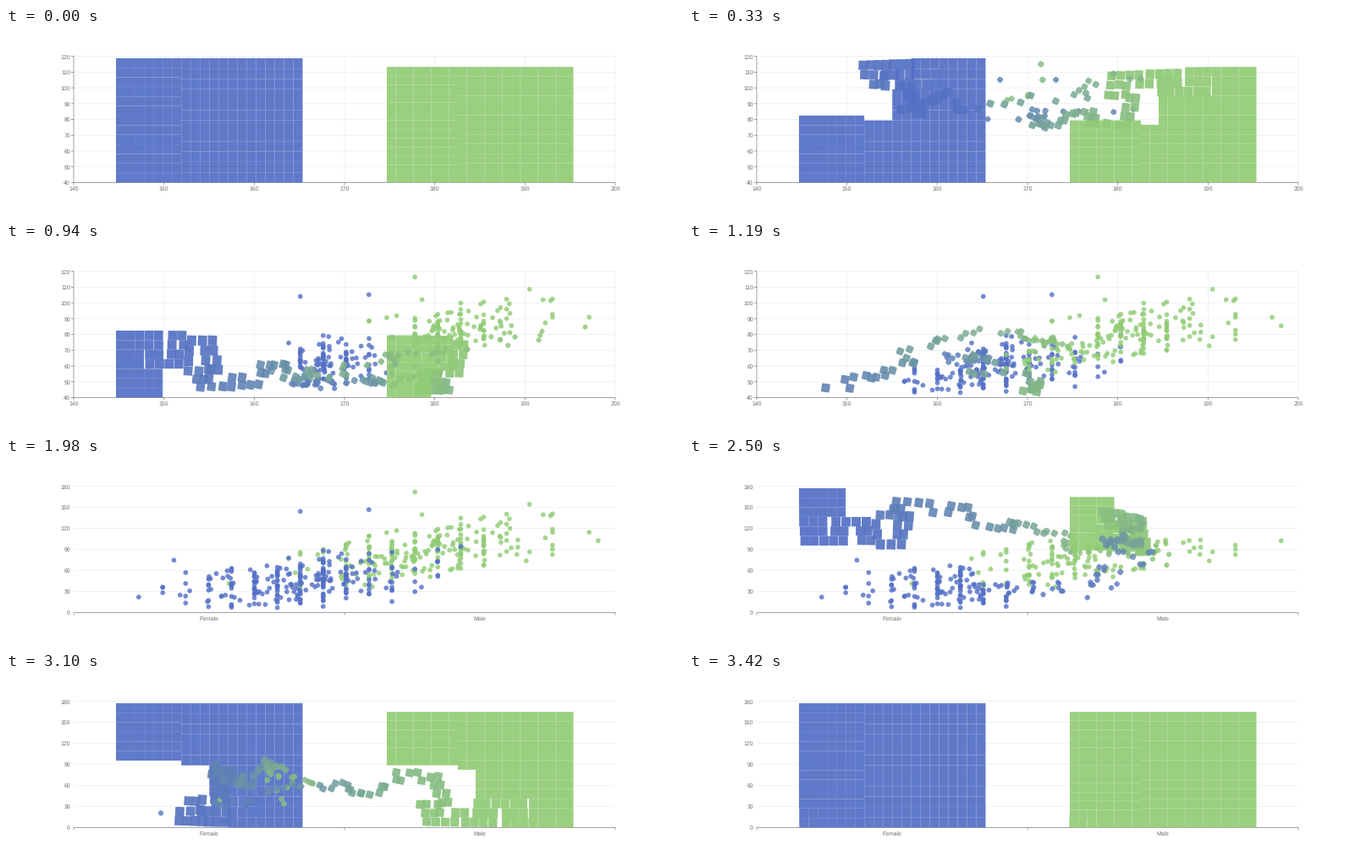
Animation, 800 px wide and 222 px high, one loop 3.45 s. Source, as a matplotlib script:

```python
import numpy as np
import matplotlib.pyplot as plt
from matplotlib.animation import FuncAnimation
from matplotlib.collections import LineCollection, PolyCollection
from matplotlib.colors import to_rgb

plt.rcParams["text.hinting"] = "none"

W, H, DPI = 800, 222, 100
LOOP, TICK = 3450, 10
SCATTER_END, BARS_IN = 1500, 1980
LEAD = 20  # the way back is already under way when it appears
DURATION, SPREAD = 500, 1000
LEFT, RIGHT, TOP, BASE = 80, 720, 33.6, 183.5
RADIUS = 2.86
BLUE, GREEN = (np.array(to_rgb(c)) for c in ("#5470c6", "#91cc75"))
BAR_ALPHA, DOT_ALPHA = 0.93, 0.82
GRID, INK = "#e4eeee", "#6e7079"

rng = np.random.default_rng(11)


def px(pt):
    return pt * 72 / DPI


# ---------- data: height (cm), weight (kg) ----------
def people(count, extremes, mean, sd, slope, noise, lo, hi):
    pts = list(extremes)
    while len(pts) < count:
        h = rng.normal(mean[0], sd)
        w = mean[1] + slope * (h - mean[0]) + rng.normal(0, noise)
        if rng.random() < 0.55:
            h = round(h / 2.54) * 2.54
        if lo[0] < h < hi[0] and lo[1] < w < hi[1]:
            pts.append((h, w))
    pts = np.array(pts)
    x = LEFT + (pts[:, 0] - 140) / 60 * (RIGHT - LEFT)
    y = BASE - (pts[:, 1] - 40) / 80 * (BASE - TOP)
    return np.column_stack([x, y])


women = people(260, [(147.2, 49.8), (151.1, 73.2), (165.1, 104.1), (172.7, 105.2), (182.9, 81.8)],
               mean=(164.9, 59.8), sd=6.3, slope=0.6, noise=8, lo=(149.5, 43), hi=(180.5, 87))
men = people(247, [(157.2, 58.4), (177.8, 116.4), (190.5, 108.6), (192, 102), (197.1, 90.9), (198.1, 85.5)],
             mean=(177.6, 77.6), sd=6.8, slope=0.75, noise=9, lo=(163, 54), hi=(193.5, 103))


# ---------- splitting and matching ----------
def split(x, y, w, h, count):
    """Divide a wide rect into columns of cells: rows of cx, cy, w, h."""
    cols = int(np.ceil(np.sqrt(w / h * count)))
    rows, spare = divmod(count, cols)
    cw = w / cols
    cells = []
    for c in range(cols):
        n = rows + (c < spare)
        cells += [(x + (c + 0.5) * cw, y + (r + 0.5) * h / n, cw, h / n)
                  for r in range(n)]
    return np.array(cells)


def hilbert(x, y):
    d, s = 0, 1 << 15
    while s:
        rx, ry = int(x & s > 0), int(y & s > 0)
        d += s * s * ((3 * rx) ^ ry)
        if not ry:
            if rx:
                x, y = s - 1 - x, s - 1 - y
            x, y = y, x
        s >>= 1
    return d


def curve_sort(a):
    xy = a[:, :2]
    lo, hi = xy.min(0), xy.max(0)
    grid = np.round(32767 * (xy - lo) / (hi - lo)).astype(int)
    keys = [hilbert(int(x), int(y)) for x, y in grid]
    return a[np.argsort(keys, kind="stable")]


PHI = np.radians(np.arange(0, 360, 15))
CIRCLE = np.column_stack([np.cos(PHI), np.sin(PHI)])
SQUARE = CIRCLE / np.abs(CIRCLE).max(1, keepdims=True)


class Group:
    """Cells of one bar paired with the dots they turn into."""

    def __init__(self, bar, dots, bar_color, dot_color):
        self.cells = curve_sort(split(*bar, len(dots)))
        self.dots = curve_sort(dots)
        self.delay = np.linspace(0, SPREAD, len(dots))
        self.colors = np.append(bar_color, BAR_ALPHA), np.append(dot_color, DOT_ALPHA)

    def progress(self, t):
        u = np.clip((t - self.delay) / DURATION, 0, 1)
        return np.where(u < 0.5, 4 * u ** 3, 1 - 4 * (1 - u) ** 3)

    def shapes(self, f):
        """f = 0 is the bar, f = 1 the dots."""
        k = f[:, None, None]
        outline = (SQUARE * self.cells[:, None, 2:] / 2) * (1 - k) + CIRCLE * RADIUS * k
        a = f[:, None] * np.pi / 4
        x, y = outline[..., 0], outline[..., 1]
        turned = np.stack([x * np.cos(a) - y * np.sin(a),
                           x * np.sin(a) + y * np.cos(a)], axis=-1)
        centre = self.cells[:, :2] * (1 - f[:, None]) + self.dots * f[:, None]
        bar, dot = self.colors
        return turned + centre[:, None], bar + (dot - bar) * f[:, None]


def bar_rect(x, top):
    return x, top, 220.5, BASE - top


left_bar = Group(bar_rect(130, 35.8), men, BLUE, GREEN)
right_bar = Group(bar_rect(450, 46.2), women, GREEN, BLUE)

# ---------- stage ----------
fig = plt.figure(figsize=(W / DPI, H / DPI), dpi=DPI, facecolor="white")
ax = fig.add_axes([0, 0, 1, 1])
ax.set(xlim=(0, W), ylim=(H, 0))
ax.axis("off")


def lines(segs, color, z):
    return ax.add_collection(LineCollection(
        segs, colors=color, linewidths=px(0.65), zorder=z, snap=False))


def label(x, y, s, **kw):
    return ax.text(x, y, s, size=px(6.9), color=INK, family="Liberation Sans", **kw)


def y_labels(values):
    ys = np.linspace(BASE, TOP, len(values))
    texts = [label(76, y + 0.3, str(v), ha="right", va="center_baseline")
             for v, y in zip(values, ys)]
    return ys, texts


def x_label(x, s):
    return label(x, 193.4, s, ha="center", va="baseline")


def across(ys):
    return [[(LEFT, y), (RIGHT, y)] for y in ys]


def x_ticks(xs):
    return [[(x, BASE), (x, BASE + 3)] for x in xs]


def value_axes():
    ys, art = y_labels(range(40, 121, 10))
    xs = np.linspace(LEFT, RIGHT, 7)
    art += [x_label(x, str(v)) for x, v in zip(xs, range(140, 201, 10))]
    art.append(lines(across(ys[1:]) + [[(x, TOP), (x, BASE)] for x in xs[1:]], GRID, 1))
    art.append(lines(across([BASE]) + [[(LEFT, TOP), (LEFT, BASE)]] + x_ticks(xs)
                     + [[(LEFT - 3, y), (LEFT, y)] for y in ys], INK, 2))
    return art


def category_axes():
    ys, art = y_labels(range(0, 181, 30))
    art += [x_label(240, "Female"), x_label(560, "Male")]
    art.append(lines(across(ys[1:]), GRID, 1))
    art.append(lines(across([BASE]) + x_ticks((LEFT, 400, RIGHT)), INK, 2))
    return art


scatter_axes, bar_axes = value_axes(), category_axes()
pieces = ax.add_collection(PolyCollection([], linewidths=0, zorder=3, snap=False))

# the picture refreshes in even runs with short pauses between them
RUNS = [(0, 0, 1), (30, 580, 12), (620, 1070, 10), (1140, SCATTER_END, 9),
        (BARS_IN, 2500, 11), (2530, 2810, 7), (2900, 3010, 4), (3100, 3420, 8)]
STEPS = np.concatenate([np.linspace(*run) for run in RUNS])


def draw(i):
    t = STEPS[np.searchsorted(STEPS, i * TICK + 0.5) - 1]
    to_bars = t >= BARS_IN
    for a in scatter_axes:
        a.set_visible(not to_bars)
    for a in bar_axes:
        a.set_visible(to_bars)

    order = (left_bar, right_bar) if to_bars else (right_bar, left_bar)
    if to_bars:
        parts = [g.shapes(1 - g.progress(t - BARS_IN + LEAD)) for g in order]
    else:
        parts = [g.shapes(g.progress(t)) for g in order]
    verts, colors = (np.concatenate(p) for p in zip(*parts))
    pieces.set_verts(verts)
    pieces.set_facecolor(colors)
    return [pieces]


anim = FuncAnimation(fig, draw, frames=LOOP // TICK, interval=TICK,
                     init_func=lambda: [pieces], repeat=True, repeat_delay=0,
                     cache_frame_data=False)
plt.show()
```
